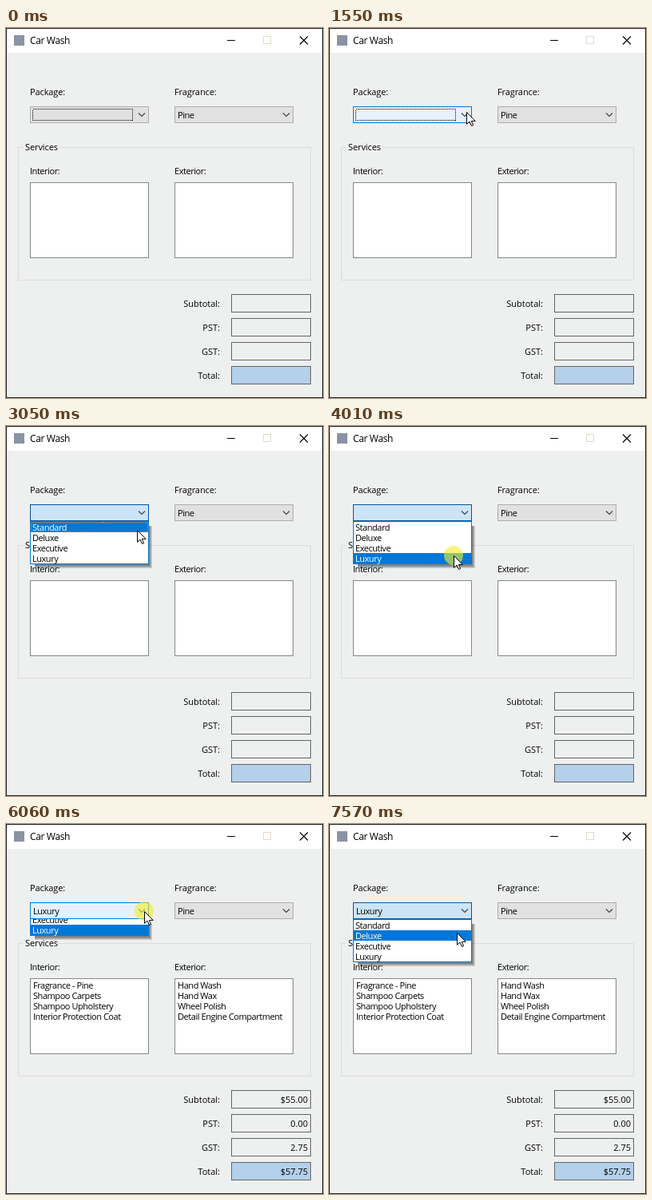
These frames come from a looping animation (397x463 px, 8000 ms). An HTML page:

```html
<!DOCTYPE html>
<html lang="en">
<head>
<meta charset="utf-8">
<title>Car Wash</title>
<style>
html, body { margin: 0; width: 100%; height: 100%; overflow: hidden; background: #eef0ef; }
svg { display: block; }
text { font: 11px "Open Sans", "Noto Sans", sans-serif; letter-spacing: -.45px; fill: #000; white-space: pre; }
.label { letter-spacing: -.1px; }
.num { letter-spacing: 0; text-anchor: end; }
.title { font-size: 12px; letter-spacing: -.35px; }
rect { shape-rendering: crispEdges; }
.thin { fill: none; stroke: #444; stroke-width: 1.2; }
</style>
</head>
<body>
<script>
const LOOP = 8000, STEP = 70;
const FACE = '#eef0ef', BLUE = '#0078d7';
const PACKAGES = ['Standard', 'Deluxe', 'Executive', 'Luxury'];
const INTERIOR = ['Fragrance - Pine', 'Shampoo Carpets', 'Shampoo Upholstery', 'Interior Protection Coat'];
const EXTERIOR = ['Hand Wash', 'Hand Wax', 'Wheel Polish', 'Detail Engine Compartment'];
const TOTALS = [['Subtotal:', '$55.00'], ['PST:', '0.00'], ['GST:', '2.75'], ['Total:', '$57.75']];

const text = (x, y, s, cls = '') => `<text x="${x}" y="${y}" class="${cls}">${s}</text>`;
const fill = (x, y, w, h, color, more = '') =>
  `<rect x="${x}" y="${y}" width="${w}" height="${h}" fill="${color}" ${more}/>`;
const box = (x, y, w, h, color, line, more = '') =>
  fill(x + .5, y + .5, w - 1, h - 1, color, `stroke="${line}" ${more}`);
const lines = (x, y, list) => list.map((s, i) => text(x, y + 13 * i, s)).join('');
const chevron = x => `<path class="thin" d="M${x} 106.5l4 4 4-4"/>`;

const windowFrame =
  fill(0, 0, 397, 463, FACE) + fill(0, 0, 397, 31, '#fff') +
  box(0, 0, 397, 463, 'none', '#222') +
  fill(10, 9, 13, 13, '#8a93a3') + text(30, 20, 'Car Wash', 'title') +
  fill(277, 15, 10, 1, '#000') + box(322, 10, 10, 10, 'none', '#e2dacb') +
  '<path d="M368 10.5l10 10m0-10l-10 10" stroke="#000" stroke-width="1.1"/>';

const form =
  text(30, 84, 'Package:', 'label') + text(211, 84, 'Fragrance:', 'label') +
  box(30, 98, 149, 21, '#e1e1e1', '#adadad', 'id="combo"') + chevron(166) +
  box(33, 101, 126, 15, 'none', '#000', 'id="focus" stroke-dasharray="1 1"') +
  '<text id="chosen" x="34" y="113">Luxury</text>' +
  box(211, 98, 149, 21, '#e1e1e1', '#adadad') + chevron(347) + text(215, 113, 'Pine') +
  box(15, 149, 367, 167, 'none', '#dcdcdc') + fill(22, 146, 44, 8, FACE) +
  text(24, 153, 'Services', 'label') +
  text(30, 183, 'Interior:') + text(211, 183, 'Exterior:') +
  box(30, 193, 149, 95, '#fff', '#828790') + box(211, 193, 149, 95, '#fff', '#828790') +
  TOTALS.map(([name], i) =>
    text(268, 349 + 30 * i, name, 'num label') +
    box(282, 333 + 30 * i, 100, 23, i === 3 ? '#b4d0eb' : FACE, '#646464')).join('');

const results = '<g id="results">' + lines(34, 206, INTERIOR) + lines(215, 206, EXTERIOR) +
  TOTALS.map(([, sum], i) => text(378, 349 + 30 * i, sum, 'num')).join('') + '</g>';

const menu = '<g id="menu"><g id="shadow">' +
  [0, 1, 2, 3].map(() => fill(36, 125, 0, 0, '#000', 'opacity=".14"')).join('') +
  '</g><g clip-path="url(#below)"><g id="list">' + box(30, 119, 149, 54, '#fff', BLUE) +
  fill(31, 120, 147, 13, BLUE, 'id="mark"') +
  box(31, 120, 147, 13, 'none', '#ff8728', 'id="dots" stroke-dasharray="1 1"') +
  lines(33, 131, PACKAGES) + '</g></g></g>';

const pointer = '<g id="pointer"><circle id="click" r="12" fill="#f2ee2c" opacity=".62"/>' +
  '<path d="M.5.5V15.3L4 12.1 6.5 17.5 8.6 16.6 6.3 11.4H11.2Z" fill="#fff" stroke="#000"/></g>';

document.body.innerHTML =
  '<svg width="397" height="463" viewBox="0 0 397 463">' +
  '<clipPath id="below"><rect x="30" y="119" width="149" height="60"/></clipPath>' +
  windowFrame + form + results + menu + pointer + '</svg>';

const $ = id => document.getElementById(id);
const show = (id, on) => $(id).setAttribute('display', on ? 'inline' : 'none');
const set = (node, values) => { for (const k in values) node.setAttribute(k, values[k]); };

const hold = () => 0;
const linear = u => u;
const easeIn = u => u ** 1.4;
const easeOut = u => 1 - (1 - u) ** 1.5;
const glide = u => 1 - (1 - u) ** 2.35;
const smooth = u => u * u * (3 - 2 * u);

// Pointer path: arrival time, x, y, easing of the way there
const PATH = [
  [500, 377, 304, hold], [1550, 172, 105, glide], [1690, 170, 104, linear],
  [2700, 170, 104, hold], [3050, 164, 130, easeIn], [3540, 156, 161, easeOut],
  [3610, 156, 162, hold], [4160, 156, 161, hold], [4900, 156, 160, hold],
  [5090, 156, 160, hold], [5860, 173, 109, smooth], [6400, 173, 110, hold],
  [6660, 173, 110, hold], [7500, 159, 135, smooth], [7570, 160, 136, hold]
];

function pointerAt(t) {
  const next = PATH.findIndex(p => p[0] > t);
  if (next < 0) return PATH[PATH.length - 1].slice(1, 3);
  const a = PATH[next - 1], b = PATH[next];
  const u = b[3](Math.floor((t - a[0]) / STEP) * STEP / (b[0] - a[0]));
  return [1, 2].map(i => Math.round(a[i] + (b[i] - a[i]) * u));
}

const mix = (a, b, u) => `rgb(${a.map((v, i) => Math.round(v + (b[i] - v) * u))})`;
const NORMAL = [[225, 225, 225], [173, 173, 173]];
const HOVER = [[229, 241, 251], [0, 120, 215]];
const DOWN = [[204, 228, 247], [0, 84, 153]];
const between = (t, a, b) => t >= a && t < b;

// Stages of the menu sliding open after a press
const HEIGHTS = [0, 21, 42, 54];

function draw(t) {
  const seen = t >= 500;
  const [x, y] = seen ? pointerAt(t) : [0, 0];
  const pressed = t >= 5990 ? 5990 : between(t, 1820, 4160) ? 1820 : null;
  const stage = pressed === null ? 0 : Math.min(3, Math.floor((t - pressed) / STEP));
  const height = HEIGHTS[stage];
  const open = height > 0;

  show('pointer', seen);
  $('pointer').setAttribute('transform', `translate(${x} ${y})`);
  show('click', between(t, 1820, 2030) || between(t, 4010, 4160) || between(t, 5990, 6200));

  let from = NORMAL, to = NORMAL, u = 0;
  if (open) [from, to, u] = [HOVER, DOWN, (stage - 1) / 2];
  else if (between(t, 4160, 4370)) [from, to, u] = [DOWN, NORMAL, (1 + Math.floor((t - 4160) / STEP)) / 4];
  else if (seen && x < 179 && y < 119) {
    const since = t < 4000 ? 1340 : 5600;
    [from, to, u] = [NORMAL, HOVER, Math.max(.4, Math.min(1, (t - since) / 200))];
  }
  set($('combo'), { fill: mix(from[0], to[0], u), stroke: mix(from[1], to[1], u) });
  show('focus', !open);
  show('chosen', t >= 4160);
  show('results', t >= 4230);

  show('menu', open);
  if (!open) return;
  $('list').setAttribute('transform', `translate(0 ${height - 54})`);
  [...$('shadow').children].forEach((r, i) =>
    set(r, { width: 147 - i, height: Math.max(0, height - 1 - i) }));
  const row = y >= 120 ? Math.min(3, Math.floor((y - 120) / 13)) : t > 5000 ? 3 : -1;
  show('mark', row >= 0);
  show('dots', row === 0);
  $('mark').setAttribute('y', 120 + 13 * row);
  document.querySelectorAll('#list text').forEach((s, i) => {
    s.style.fill = i === row ? '#fff' : '#000';
  });
}

const start = performance.now();
function tick() {
  draw((performance.now() - start) % LOOP);
  requestAnimationFrame(tick);
}
tick();
</script>
</body>
</html>
```
